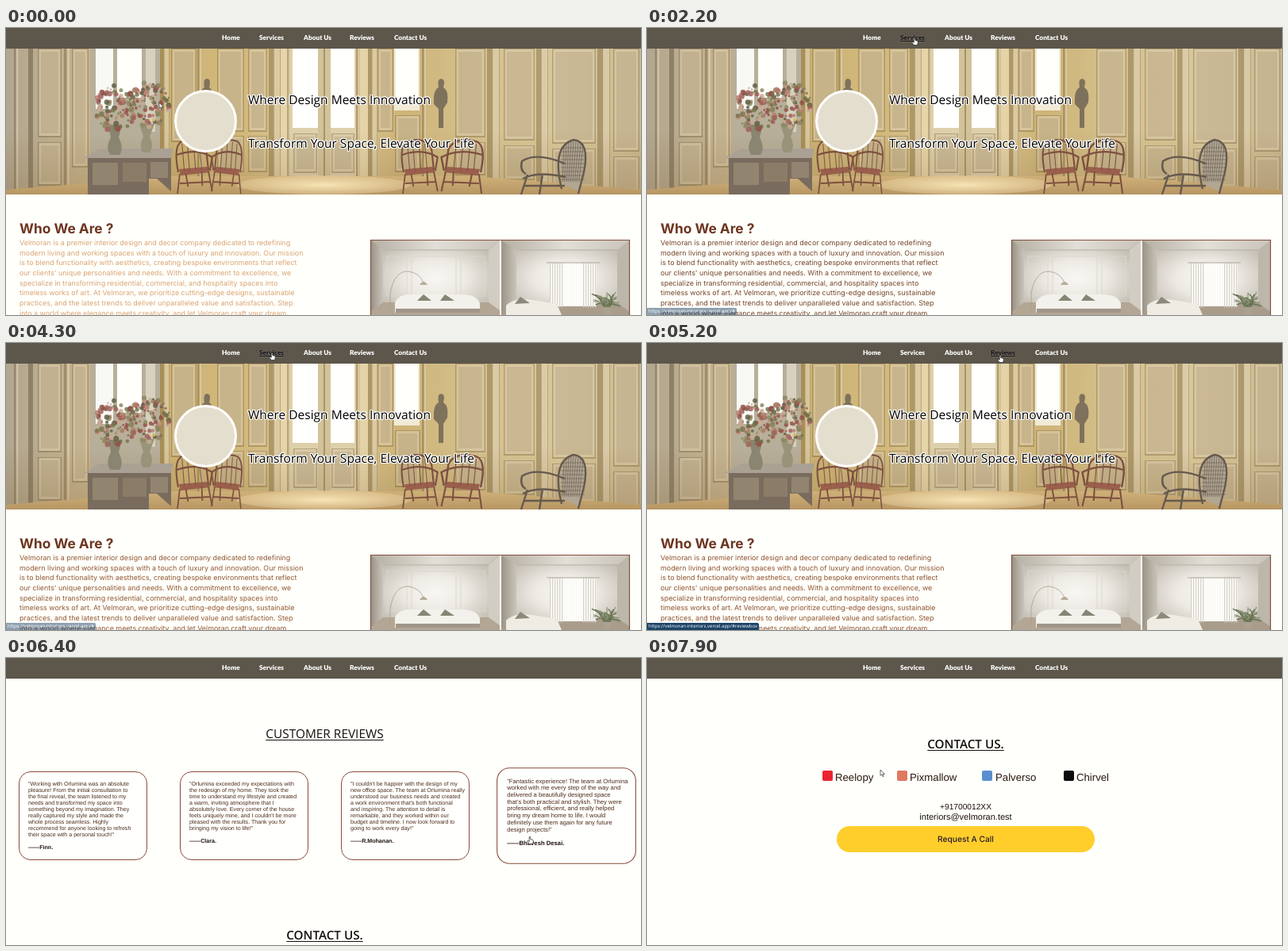
These frames come from a looping animation (800 px wide and 362 px high, 8 s). An HTML page:

```html
<!DOCTYPE html>
<html lang="en">
<head>
<meta charset="utf-8">
<title>Interior design site</title>
<style>
html, body { margin: 0; width: 100%; height: 100%; overflow: hidden; background: #fffffb; }
#stage { position: relative; width: 800px; height: 362px; overflow: hidden; background: #fffffb; text-rendering: geometricPrecision; font-family: "Liberation Sans", Arial, sans-serif; }
#stage svg, .view, .t, .card, .icon { position: absolute; }
.view { left: 0; top: 0; width: 800px; height: 620px; }
.t { line-height: 20px; white-space: pre; }
.mid { width: 400px; text-align: center; }
#nav { position: absolute; left: 0; top: 0; width: 800px; height: 26px; background: #5c564b; }
.link { font: 900 8.3px/20px Lato, sans-serif; color: #fff; }
.link.on { color: #17151a; text-decoration: underline; text-shadow: 0 0 2px #8d877c; }
.slogan { font: 400 15.5px/20px "Open Sans", sans-serif; color: #000; text-shadow: 1px 0 #fff, -1px 0 #fff, 0 1px #fff, 0 -1px #fff, 1px 1px #fff, -1px -1px #fff, 1px -1px #fff, -1px 1px #fff; }
.title { font: 700 17.3px/20px Inter, sans-serif; color: #6d3520; }
#about { position: absolute; left: 17px; top: 266.1px; white-space: pre; font: 400 8.91px/12.65px Inter, sans-serif; }
#logo { position: absolute; left: 212px; top: 78px; width: 73px; height: 73px; border: 3px solid #fffefa; border-radius: 50%; background: #e4decf; }
.head { font: 400 15.4px/20px "Open Sans", sans-serif; color: #170f0b; text-decoration: underline; text-decoration-thickness: 1px; text-underline-offset: 2px; }
.strong { font-size: 15.2px; font-weight: 600; }
.card { top: 143px; width: 160px; height: 110px; border: 1px solid #8b4b3b; border-radius: 15px; background: #fffffd; }
.card p { position: absolute; margin: 0; left: 11px; top: 11px; white-space: pre; font-size: 7.1px; line-height: 8.05px; color: #4c2a19; }
.card b { display: block; margin-top: 7.5px; color: #1d120d; }
.icon { width: 13px; height: 13px; border-radius: 2px; }
.social { font-size: 13.2px; color: #2a170e; }
.info { color: #1b100b; }
#call { position: absolute; left: 239px; top: 453px; width: 325px; height: 33px; border-radius: 17px; background: #ffce2b; text-align: center; font: 500 10.2px/34px Inter, sans-serif; color: #241b2c; }
#status { position: absolute; left: 0; top: 353px; height: 9px; padding: 0 2px; white-space: pre; font: 400 6px/9px "Open Sans", sans-serif; color: #fff; background: #1d4468; border-radius: 0 2px 0 0; }
#arrow, #hand { left: 0; top: 0; overflow: visible; }
</style>
</head>
<body>
<div id="stage">
  <div class="view" id="top">
    <svg id="photos" width="800" height="362"></svg>
    <div id="logo"></div>
    <div id="about"></div>
  </div>
  <div class="view" id="low"><div id="call">Request A Call</div></div>
  <div id="nav"></div>
  <div id="status"></div>
  <svg id="arrow" width="8" height="10"><path d="M0 0V7.4L1.8 5.8 3 8.6 4.2 8.1 3 5.4H5.3Z" fill="#fff" stroke="#33302f" stroke-width=".7"/></svg>
  <svg id="hand" width="9" height="11"><path d="M-.8 .7Q0-.4 .8 .7V3.6L3.8 4.4Q4.6 4.7 4.4 6L3.6 9.6H-.8L-3.2 6.2Q-3.2 5-1.8 5.6L-.8 6.4Z" fill="#fff" stroke="#222" stroke-width=".7"/></svg>
</div>
<script>
const $ = id => document.getElementById(id);
const top0 = $('top'), low = $('low');

function add(parent, cls, html, x, y) {
  const el = document.createElement('div');
  el.className = cls;
  el.innerHTML = html;
  el.style.left = x + 'px';
  if (y !== undefined) el.style.top = y + 'px';
  parent.append(el);
  return el;
}
const text = (parent, cls, str, x, y) => add(parent, 't ' + cls, str, x, y - 10);
const centred = (parent, cls, str, y) => text(parent, 'mid ' + cls, str, 201.5, y);

// Room pictures
let seed = 7;
const rnd = () => (seed = seed * 16807 % 2147483647) / 2147483647;
const R = (x, y, w, h, fill, o = 1) => `<rect x="${x}" y="${y}" width="${w}" height="${h}" fill="${fill}" opacity="${o}"/>`;
const L = (d, stroke, w = 1) => `<path d="${d}" fill="none" stroke="${stroke}" stroke-width="${w}"/>`;
const P = (d, fill) => `<path d="${d}" fill="${fill}"/>`;
const stops = colours => colours.map((c, i) => `<stop offset="${i / (colours.length - 1)}" stop-color="${c}"/>`).join('');
const grad = (id, dir, ...colours) => `<linearGradient id="${id}" ${dir === 'v' ? 'x2="0" y2="1"' : ''}>${stops(colours)}</linearGradient>`;
const glow = (id, ...colours) => `<radialGradient id="${id}" r=".72">${stops(colours)}</radialGradient>`;

// Mouldings tint whatever wall tone lies beneath
const DARK = '#5c431c', LIGHT = '#fff4d6';
const panel = (x, y, w, h) => R(x, y, w, h, DARK, .3) + R(x + 1.5, y + 1, w - 3, h - 3, LIGHT, .5) +
  R(x + 4, y + 4, w - 8, h - 9, DARK, .12);
const post = (x, w, h = 162) => R(x, 26, w, h, DARK, .32) + R(x + w * .45, 26, w * .5, h, LIGHT, .55);

function chair(x, sx) {
  const c = '#7d5040';
  return `<g transform="translate(${x} 0) scale(${sx} 1)">` +
    P('M-19 178L18 175 22 182-17 186Z', '#9a5f4c') +
    L('M-20 182Q-28 143-11 142Q10 138 17 153L20 179M-22 160Q5 151 25 163L22 180', c, 2.2) +
    L('M-15 146L-12 180M-8 144L-5 180M0 144L3 179M8 146L11 178', c, 1) +
    L('M-18 184L-21 209M20 181L25 206M-10 184L-7 200M11 181L12 199M-18 196L22 194', c, 1.9) + '</g>';
}

function bouquet(cx, cy, rx, ry, n) {
  const tones = ['#935148', '#76764f', '#b77e6c', '#8b8a62', '#5f6145', '#c9ab95', '#a0625a'];
  let s = '';
  for (let i = 0; i < n; i++) {
    const a = rnd() * 6.283, r = Math.sqrt(rnd());
    s += `<circle cx="${(cx + rx * r * Math.cos(a)).toFixed(1)}" cy="${(cy + ry * r * Math.sin(a)).toFixed(1)}" r="${(1.2 + rnd() * 2.3).toFixed(1)}" fill="${tones[i % 7]}" opacity=".85"/>`;
  }
  return s;
}

function hero() {
  let s = R(0, 26, 800, 184, 'url(#wall)');
  s += post(10, 6, 184) + R(28, 26, 6, 184, '#75644b', .6) + panel(40, 26, 30, 112) + panel(40, 144, 30, 55) + post(73, 8, 184) + panel(83, 26, 21, 150);
  // mirror
  s += R(106, 26, 88, 132, '#b8af9a') + R(113, 26, 22, 76, '#f8f8f4') + R(140, 26, 31, 62, '#fffffb') + R(176, 26, 12, 105, '#d8d1bf');
  s += post(194, 12) + panel(208, 26, 32, 118) + post(241, 6);
  s += panel(266, 26, 34, 105) + panel(266, 136, 34, 46) + panel(305, 26, 24, 105) + panel(305, 136, 24, 46);
  s += post(331, 15) + R(346, 26, 10, 162, LIGHT, .35) + post(354, 5);
  // tall glass doors
  s += R(358, 26, 83, 162, '#ded0aa') + R(361, 26, 32, 100, '#fffffd') + R(409, 26, 30, 100, '#fffffd') + R(393, 26, 16, 162, '#d3c39a') + R(400, 26, 2, 162, '#a79468');
  s += panel(362, 133, 30, 50) + panel(410, 133, 29, 50);
  s += post(441, 5) + R(446, 26, 10, 162, LIGHT, .35) + post(456, 12);
  s += panel(468, 26, 20, 105) + R(489, 26, 32, 78, '#f1ead6') + R(491, 26, 28, 62, '#fffffb') + panel(490, 110, 32, 72);
  s += post(524, 6) + panel(566, 26, 38, 112) + panel(566, 144, 38, 42) + post(606, 16, 170);
  s += panel(627, 26, 39, 116) + panel(627, 148, 39, 44) + post(668, 15, 175);
  s += panel(688, 26, 55, 120) + panel(688, 152, 55, 50) + post(745, 16, 184) + panel(765, 26, 33, 130) + panel(765, 162, 33, 46);
  s += R(0, 130, 800, 80, 'url(#shade)');
  // floor
  s += P('M0 210V204L210 187H590L800 204V210Z', 'url(#floor)') + `<ellipse cx="400" cy="198" rx="110" ry="12" fill="url(#shine)"/>`;
  // wall figures
  for (const x of [253, 548]) {
    s += P(`M${x - 9} 96Q${x - 10} 78 ${x - 3} 75Q${x - 5} 64 ${x} 64Q${x + 6} 64 ${x + 3} 75Q${x + 10} 79 ${x + 8} 94L${x + 3} 102V126H${x - 3}V102Z`, '#7f725c');
  }
  // console and flowers
  s += P('M98 164L118 152H211L208 164Z', '#aaa194') + P('M103 164H208V206L190 190H180V210H103Z', '#796c5e') + R(109, 170, 32, 28, '#92856f') + R(147, 170, 30, 24, '#8a7c67') + R(182, 169, 22, 20, '#928470');
  s += P('M129 122H146L142 138Q149 152 143 160H131Q125 150 132 138Z', '#8a8570') + P('M168 121H187L181 137Q187 149 181 157H172Q167 148 173 137Z', '#99937a');
  s += bouquet(138, 101, 27, 29, 110) + bouquet(181, 97, 26, 29, 105);
  s += '<circle cx="186" cy="116" r="2" fill="#d2bd4d"/>';
  s += chair(236, .95) + chair(279, -.8) + chair(520, .95) + chair(576, -1.1);
  // wicker seat
  s += P('M703 198Q690 150 717 141Q736 144 727 180L721 206Z', '#b0a692');
  for (let i = 0; i < 9; i++) s += L(`M${703 + i * 3} ${149 - Math.sin(i / 2.6) * 6}L${701 + i * 2.6} 194M699 ${151 + i * 5}H729`, '#6d6257', .7);
  s += L('M700 203Q687 149 715 141Q736 143 728 182L721 209M704 171Q668 156 650 168Q647 180 655 184M651 190Q670 180 705 188M657 185L649 210M676 184L672 210M652 199H704', '#65594f', 2.4);
  return `<g filter="url(#soft)" clip-path="url(#band)">${s}</g>`;
}

function rooms() {
  let s = R(459.5, 267, 327, 95, '#fffffb');
  for (const x of [460, 624]) s += R(x, 268, 162, 94, 'url(#room)') + P(`M${x} 268H${x + 162}L${x + 148} 279H${x + 15}Z`, 'url(#ceiling)') + L(`M${x + 15} 280H${x + 148}`, '#b8b3a6', 1.2);
  s += P('M460 268L475 280V347L460 358Z', 'url(#side)') + P('M622 268L608 280V346L622 356Z', '#d2cdc2') + P('M460 358L475 346H608L622 357V362H460Z', '#b3a694');
  for (const [x, w] of [[480, 25], [511, 56], [573, 30]]) s += `<rect x="${x}" y="288" width="${w}" height="50" fill="none" stroke="#dcd8ce"/>`;
  s += L('M484 356V335Q489 306 507 307Q521 309 526 321', '#a89f8c', .8) + P('M521 324Q526 316 531 324Z', '#b6ac97');
  s += P('M490 346Q496 334 515 336H570Q592 335 597 347V359H490Z', '#f3f1eb') + P('M518 344L526 336 536 344ZM547 344L553 336 565 344Z', '#858675') + R(491, 354, 106, 5, '#a1968a');
  s += P('M624 268L643 280V349L624 360Z', 'url(#side)') + P('M786 268L770 280V348L786 358Z', '#bdb7ab') + P('M624 360L643 347H770L786 358V362H624Z', '#a99c8b');
  s += R(685, 297, 59, 54, '#fffffc');
  for (let x = 685; x < 744; x += 3) s += R(x, 296, 1.4, 57, '#cfcac0', x < 702 || x > 726 ? .8 : .15);
  s += L('M681 296H748', '#a39d90', .8) + P('M630 350Q641 339 663 343L694 348 700 362H630Z', '#efece4') + P('M641 348L648 339 660 347Z', '#8b897a');
  for (let i = 0; i < 30; i++) s += L(`M757 357Q${(746 + rnd() * 22).toFixed(1)} 343 ${(738 + rnd() * 38).toFixed(1)} ${(333 + rnd() * 19).toFixed(1)}`, i % 2 ? '#667050' : '#8d9478', 1.3);
  s += P('M751 352H763L761 362H753Z', '#aaa18f');
  return `<g filter="url(#soft)">${s}</g>` + R(622, 268, 2, 94, '#fffffb') + L('M459.5 362V267.5H785.5V362', '#84503d', 1.2);
}

$('photos').innerHTML = '<defs><filter id="soft"><feGaussianBlur stdDeviation=".6"/></filter><clipPath id="band"><rect y="26" width="800" height="184"/></clipPath>' +
  grad('wall', 'h', '#b1a691', '#c7b48d', '#ccb273', '#d2b97d', '#dfcfa4', '#ceb477', '#d5c18f', '#d9c89b', '#cbb991') +
  grad('shade', 'v', '#7a5c2e00', '#7a5c2e40') + grad('floor', 'v', '#cfb078', '#b79663') + glow('shine', '#f7e3b4', '#f7e3b400') +
  glow('room', '#f8f7f3', '#edeae4', '#cbc6bc', '#a8a297') + grad('ceiling', 'h', '#b5afa3', '#e2dfd7', '#c9c4ba') + grad('side', 'h', '#9a9387', '#c9c4b9') +
  '</defs>' + hero() + rooms();

// Page text
text(top0, 'slogan', 'Where Design Meets Innovation', 305, 90);
text(top0, 'slogan', 'Transform Your Space, Elevate Your Life', 305, 145);
text(top0, 'title', 'Who We Are ?', 17, 254);
$('about').textContent = `Velmoran is a premier interior design and decor company dedicated to redefining
modern living and working spaces with a touch of luxury and innovation. Our mission
is to blend functionality with aesthetics, creating bespoke environments that reflect
our clients' unique personalities and needs. With a commitment to excellence, we
specialize in transforming residential, commercial, and hospitality spaces into
timeless works of art. At Velmoran, we prioritize cutting-edge designs, sustainable
practices, and the latest trends to deliver unparalleled value and satisfaction. Step
into a world where elegance meets creativity, and let Velmoran craft your dream`;

const reviews = [
  ['Finn', `Working with Orlumina was an absolute
pleasure! From the initial consultation to
the final reveal, the team listened to my
needs and transformed my space into
something beyond my imagination. They
really captured my style and made the
whole process seamless. Highly
recommend for anyone looking to refresh
their space with a personal touch!`],
  ['Clara', `Orlumina exceeded my expectations with
the redesign of my home. They took the
time to understand my lifestyle and created
a warm, inviting atmosphere that I
absolutely love. Every corner of the house
feels uniquely mine, and I couldn't be more
pleased with the results. Thank you for
bringing my vision to life!`],
  ['R.Mohanan', `I couldn't be happier with the design of my
new office space. The team at Orlumina really
understood our business needs and created
a work environment that's both functional
and inspiring. The attention to detail is
remarkable, and they worked within our
budget and timeline. I now look forward to
going to work every day!`],
  ['Bhavesh Desai', `Fantastic experience! The team at Orlumina
worked with me every step of the way and
delivered a beautifully designed space
that's both practical and stylish. They were
professional, efficient, and really helped
bring my dream home to life. I would
definitely use them again for any future
design projects!`]
];
const cardX = i => 16 + 203 * i;
const cards = reviews.map(([who, words], i) => add(low, 'card', `<p>"${words}"<b>——${who}.</b></p>`, cardX(i)));

centred(low, 'head', 'CUSTOMER REVIEWS', 95.5);
centred(low, 'head strong', 'CONTACT US.', 349.5);
[['Reelopy', 221, 237, '#ec2430'], ['Pixmallow', 315, 331, '#e0775f'], ['Palverso', 422, 439, '#5a8fd0'], ['Chirvel', 525, 541, '#0c0c0c']]
  .forEach(([name, ix, tx, colour]) => {
    add(low, 'icon', '', ix, 383).style.background = colour;
    text(low, 'social', name, tx, 392);
  });
centred(low, 'info', '+91700012XX', 429.5).style.fontSize = '10.2px';
centred(low, 'info', 'interiors@velmoran.test', 441.5).style.fontSize = '11px';

const links = [['Home', 272, 295, 'home'], ['Services', 319, 351, ''], ['About Us', 375, 409, 'about'], ['Reviews', 433, 464, 'reviewbox'], ['Contact Us', 489, 530, 'contact']];
const linkEls = links.map(([name, x]) => text($('nav'), 'link', name, x, 11.5));

// Motion tables: time, then values
const pointer = [[0, 193, 94], [300, 250, 120], [700, 262, 165], [1000, 263, 214], [1400, 263, 214], [2000, 332, 40], [2100, 337, 12], [2600, 337, 12],
  [3000, 285, 12], [3300, 270, 19], [3500, 264, 27], [3700, 264, 27], [4000, 285, 12], [4300, 335, 12], [4600, 392, 12], [4900, 445, 15], [5400, 445, 15],
  [5700, 100, 190], [5900, 300, 200], [6150, 500, 215], [6330, 618, 224], [6400, 660, 225], [6600, 660, 225], [7000, 510, 13], [7300, 510, 13], [7900, 294, 141]];
const spin = [[0, 0], [200, 0], [700, 180], [1000, 87], [1300, 0]];
const ink = [[0, 218, 164, 116], [1000, 106, 58, 36], [2200, 116, 68, 42], [3500, 148, 94, 54], [5200, 142, 82, 46]];
const REVIEWS_AT = 5400, CONTACT_AT = 7200, CONTACT_SHIFT = 241;

function at(table, t) {
  const i = table.findIndex(row => row[0] > t);
  if (i < 0) return table[table.length - 1].slice(1);
  if (i === 0) return table[0].slice(1);
  const a = table[i - 1], b = table[i], k = (t - a[0]) / (b[0] - a[0]);
  return a.slice(1).map((v, n) => v + (b[n + 1] - v) * k);
}

function linkAt(t) {
  if (t < 0) return -1;
  const [x, y] = at(pointer, t);
  return y > 5 && y < 19 ? links.findIndex(l => x >= l[1] && x <= l[2]) : -1;
}

function draw(t) {
  const [x, y] = at(pointer, t), link = linkAt(t), before = linkAt(t - 200);
  const lower = t >= REVIEWS_AT, contact = t >= CONTACT_AT;
  top0.style.display = lower ? 'none' : '';
  low.style.display = lower ? '' : 'none';
  low.style.top = contact ? -CONTACT_SHIFT + 'px' : 0;
  $('logo').style.transform = `rotateY(${at(spin, t)[0]}deg)`;
  $('about').style.color = `rgb(${at(ink, t).map(Math.round)})`;

  linkEls.forEach((el, i) => el.classList.toggle('on', i === link));
  const card = lower && !contact && y > 143 && y < 255 ? reviews.findIndex((_, i) => x >= cardX(i) && x <= cardX(i) + 162) : -1;
  cards.forEach((el, i) => el.style.transform = i === card ? 'scale(1.085)' : 'none');

  const shown = link >= 0 ? link : before;
  if (shown >= 0) $('status').textContent = 'https://velmoran-interiors.vercel.app/#' + links[shown][3];
  $('status').style.opacity = ((link >= 0) + (before >= 0)) / 2;

  const pointing = link >= 0 || card >= 0;
  $('hand').style.display = pointing ? '' : 'none';
  $('arrow').style.display = pointing ? 'none' : '';
  $(pointing ? 'hand' : 'arrow').style.transform = `translate(${x}px, ${y}px)`;
}

const LOOP = 8000, STEP = 100, start = performance.now();
function tick() {
  draw(Math.floor((performance.now() - start) % LOOP / STEP) * STEP);
  requestAnimationFrame(tick);
}
tick();
</script>
</body>
</html>
```
